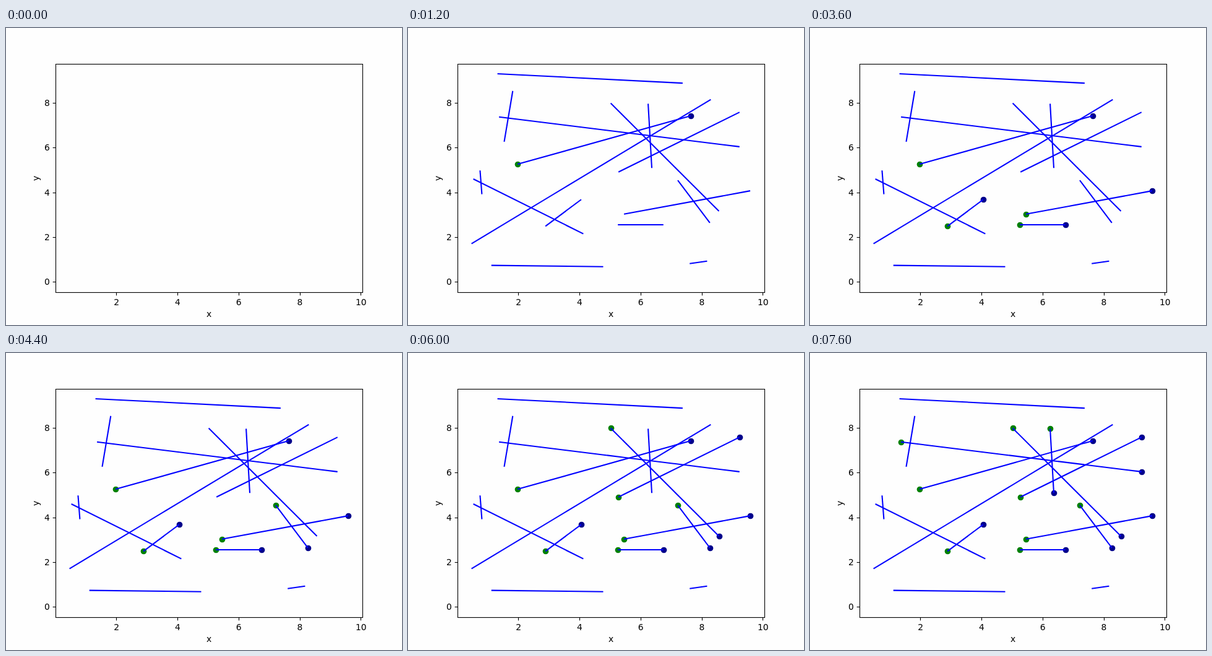
Write an HTML page that moves like this. It is 640 px wide and 480 px high and loops after 8000 ms.

```html
<!DOCTYPE html>
<html lang="en">
<head>
<meta charset="utf-8">
<title>Line segments</title>
<style>
html, body { margin: 0; width: 100%; height: 100%; overflow: hidden; background: #fefefe; }
svg { display: block; width: 640px; height: 480px; }
text { font: 13.89px "DejaVu Sans", sans-serif; fill: #000; text-anchor: middle; }
.axis { fill: none; stroke: #000; stroke-width: 1.11; }
#lines { stroke: #00f; stroke-width: 2.08; }
</style>
</head>
<body>
<svg viewBox="0 0 640 480">
  <g id="dots"></g>
  <g id="lines"></g>
  <g id="axes">
    <rect class="axis" x="80.5" y="58.5" width="496" height="369"/>
    <text x="328" y="467">x</text>
    <text transform="translate(53 243) rotate(-90)">y</text>
  </g>
</svg>
<script>
const STEP = 400, LOOP = 8000;

// Key points in plot units, in marking order: start x, y, end x, y
const segments = [
  [1.98, 5.26, 7.64, 7.42],
  [5.46, 3.03, 9.59, 4.07],
  [2.89, 2.49, 4.06, 3.68],
  [5.26, 2.554, 6.75, 2.554],
  [7.22, 4.54, 8.27, 2.64],
  [5.025, 7.986, 8.567, 3.16],
  [5.28, 4.91, 9.24, 7.58],
  [6.25, 7.96, 6.37, 5.09],
  [1.37, 7.37, 9.24, 6.04],
  [1.32, 9.3, 7.38, 8.88],
  [1.82, 8.53, 1.54, 6.26],
  [0.75, 4.98, 0.81, 3.92],
  [0.53, 4.6, 4.13, 2.15],
  [0.47, 1.71, 8.3, 8.15],
  [1.12, 0.74, 4.78, 0.68],
  [7.61, 0.82, 8.18, 0.93]
];

const toX = v => 79.4 + 49.39 * v;
const toY = v => 410.4 - 36.18 * v;
// Ticks and dots sit on pixel centres
const snap = v => Math.round(v) + 0.5;

const [axes, lines, dots] = ["axes", "lines", "dots"].map(id => document.getElementById(id));

function add(parent, tag, attrs, text = "") {
  const el = document.createElementNS("http://www.w3.org/2000/svg", tag);
  for (const key in attrs) el.setAttribute(key, attrs[key]);
  el.textContent = text;
  return parent.appendChild(el);
}

function addTick(path, x, y, label) {
  add(axes, "path", { class: "axis", d: path });
  add(axes, "text", { x, y }, label);
}

function addDot(x, y, fill) {
  return add(dots, "circle", { cx: snap(toX(x)), cy: snap(toY(y)), r: 4.86, fill });
}

for (let v = 0; v <= 8; v += 2) {
  const x = toX(v + 2), y = toY(v);
  addTick(`M${snap(x)} 427.5v4.86`, x + 0.5, 448, v + 2);
  addTick(`M80.5 ${snap(y)}h-4.86`, 66.5, Math.round(y) + 5, v);
}

const marks = segments.flatMap(([x1, y1, x2, y2]) => {
  add(lines, "line", { x1: toX(x1), y1: toY(y1), x2: toX(x2), y2: toY(y2) });
  return [addDot(x1, y1, "#008000"), addDot(x2, y2, "#00008b")];
});

const show = (el, on) => { el.style.display = on ? "" : "none"; };

// The lines appear first, then one dot per step
function draw(time) {
  const step = Math.floor((time % LOOP) / STEP);
  show(lines, step >= 1);
  marks.forEach((mark, i) => show(mark, step >= i + 2));
}

const start = performance.now();
function tick() {
  draw(performance.now() - start);
  requestAnimationFrame(tick);
}
tick();
</script>
</body>
</html>
```
